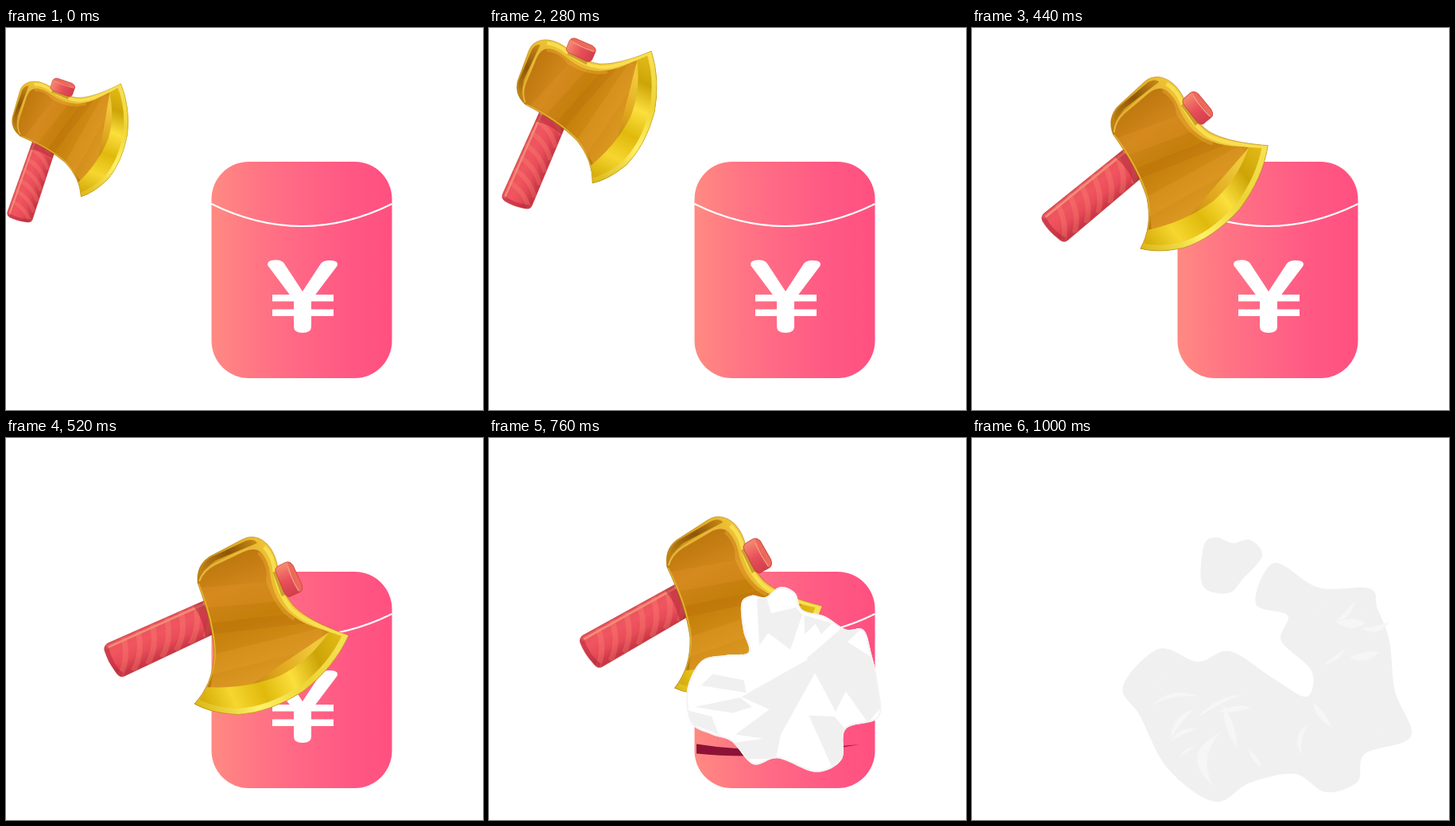
Animation, 600 px wide and 480 px high, one loop 1200 ms. Source, as an HTML page with a canvas:

```html
<!DOCTYPE html>
<html lang="en">
<head>
<meta charset="utf-8">
<title>Axe and red envelope</title>
<style>
html, body { margin: 0; width: 100%; height: 100%; overflow: hidden; background: #fff; }
canvas { display: block; width: 600px; height: 480px; }
</style>
</head>
<body>
<canvas id="stage" width="600" height="480"></canvas>
<script>
const ctx = document.getElementById('stage').getContext('2d');
const LOOP = 1200, STEP = 40;

const clamp = (v, a = 0, b = 1) => Math.min(b, Math.max(a, v));
const lerp = (a, b, k) => a + (b - a) * k;
const progress = (t, from, to) => clamp((t - from) / (to - from));

// Axe pose: time, centre x, centre y, degrees, scale
const POSES = [
  [80, 85.3, 173.7, -46.6, 0.71],
  [200, 98.3, 152, -46.6, 0.795],
  [280, 123, 148, -42, 0.857],
  [360, 183, 168, -29.1, 0.918],
  [440, 229, 226, -15, 0.972],
  [520, 267.7, 287.7, 0, 1],
  [580, 278, 324, 7, 1],
  [640, 272.3, 313.3, 5.2, 1],
  [840, 250.2, 232.3, -12, 1],
  [960, 228, 188, -20, 1]
];

// Smooth curve through the poses
function poseAt(t) {
  const last = POSES.length - 1;
  if (t <= POSES[0][0]) return POSES[0];
  if (t >= POSES[last][0]) return POSES[last];
  const i = POSES.findIndex(p => p[0] > t) - 1;
  const a = POSES[i], b = POSES[i + 1], span = b[0] - a[0];
  const k = (t - a[0]) / span, k2 = k * k, k3 = k2 * k;
  const slope = (n, j) => n === 0 || n === last ? (b[j] - a[j]) / span
    : (POSES[n + 1][j] - POSES[n - 1][j]) / (POSES[n + 1][0] - POSES[n - 1][0]);
  return a.map((v, j) =>
    (2 * k3 - 3 * k2 + 1) * v + (k3 - 2 * k2 + k) * span * slope(i, j) +
    (3 * k2 - 2 * k3) * b[j] + (k3 - k2) * span * slope(i + 1, j));
}

function gradient(x0, y0, x1, y1, ...colors) {
  const g = ctx.createLinearGradient(x0, y0, x1, y1);
  colors.forEach((c, i) => g.addColorStop(i / (colors.length - 1), c));
  return g;
}

function fill(path, style) {
  ctx.fillStyle = style;
  ctx.fill(path);
}

function stroke(path, style, width) {
  ctx.strokeStyle = style;
  ctx.lineWidth = width;
  ctx.stroke(path);
}

function inside(path, draw) {
  ctx.save();
  ctx.clip(path);
  draw();
  ctx.restore();
}

// Closed curve through every point
function blob(pts) {
  const n = pts.length / 2, p = new Path2D();
  const at = i => [pts[(i + n) % n * 2], pts[(i + n) % n * 2 + 1]];
  p.moveTo(...at(0));
  for (let i = 0; i < n; i++) {
    const a = at(i - 1), b = at(i), c = at(i + 1), d = at(i + 2);
    p.bezierCurveTo(b[0] + (c[0] - a[0]) / 6, b[1] + (c[1] - a[1]) / 6,
      c[0] - (d[0] - b[0]) / 6, c[1] - (d[1] - b[1]) / 6, c[0], c[1]);
  }
  p.closePath();
  return p;
}

// ---------- envelope ----------
const packet = new Path2D();
packet.roundRect(258.5, 168, 227, 272, 47);
const flap = new Path2D('M258.5 221Q372 277 485.5 221');
const yen = new Path2D('M329 298Q328 291 340 291.5Q347 291.5 350 296L373 331L396 296' +
  'Q399 292 407 292Q419 292 416.5 299L384 342V375Q384 383 373 383Q362 383 362 375V342Z');
const slash = new Path2D('M261 384.5Q345 398 466 385Q350 406 261 396.5Z');

function drawEnvelope(t) {
  if (t >= 800) return;
  const hit = t <= 640 ? progress(t, 560, 640) : 1 - progress(t, 640, 720);
  const s = 1 - 0.098 * hit;
  ctx.save();
  ctx.translate(296, 349);
  ctx.scale(s, s);
  ctx.translate(-296, -349);
  fill(packet, gradient(259, 0, 486, 0, '#ff8a82', '#ff7584', '#ff6685', '#ff5884', '#ff5080'));
  stroke(flap, '#fff', 2);
  fill(yen, '#fff');
  ctx.fillRect(335, 335, 77, 8.5);
  ctx.fillRect(335, 353.5, 77, 8.5);
  ctx.restore();
  if (t >= 640) fill(slash, '#8c1236');
}

// ---------- axe ----------
const handle = new Path2D('M128 258L262 199L272 241L149 299Q143 302 138 294Q128 281 124 267Q123 261 128 258Z');

function drawHandle() {
  fill(handle, gradient(190, 230, 207, 270, '#e8545a', '#f05560', '#e84c58', '#c93645'));
  inside(handle, () => {
    for (let x = 150; x < 260; x += 18) {
      const y = 289 - (x - 150) * 0.467;
      stroke(new Path2D(`M${x - 8} ${y + 12}Q${x + 5} ${y - 10} ${x - 2} ${y - 38}`),
        'rgba(255,145,120,.28)', 7);
    }
    stroke(new Path2D('M126 264L262 203'), '#f58a78', 3);
    stroke(new Path2D('M126 262Q132 286 146 298'), 'rgba(170,30,55,.45)', 5);
    stroke(new Path2D('M240 207Q254 224 257 250'), 'rgba(150,25,40,.4)', 12);
  });
  stroke(handle, 'rgba(190,50,60,.75)', 1);
}

const cut = 'Q413 288 374 318Q332 345 292 347.5Q258 346 237 334';
const head = new Path2D('M241 182Q239 160 256 149L298 127Q310 121 322 128Q336 137 341 158' +
  'Q344 190 362 211Q382 231 431 248' + cut + 'Q260 310 262 272Q260 232 241 182Z');
const face = new Path2D('M243 183Q247 170 262 161L299 143Q314 136 322 145Q330 155 332 170' +
  'Q336 205 359 222Q376 236 408 243L249 350Q264 292 262 260Q259 225 243 183Z');

function drawHead() {
  fill(head, gradient(242, 190, 340, 150, '#b97a10', '#dfa51c', '#f0c83a'));
  const recess = new Path2D('M246 168Q247 154 264 147L302 129Q312 126 316 132L263 154Z');
  fill(recess, gradient(247, 165, 316, 130, '#b97d14', '#8d5608', '#c98a18'));
  inside(head, () => {
    fill(face, gradient(270, 150, 325, 310, '#bd770d', '#cf851a', '#c47f0b', '#d18c18', '#dc9a24'));
    inside(face, () => {
      stroke(new Path2D('M235 202L345 192'), 'rgba(230,150,45,.25)', 26);
      stroke(new Path2D('M245 241L385 225'), 'rgba(170,90,0,.2)', 14);
      stroke(new Path2D('M245 288L400 250'), 'rgba(238,165,50,.22)', 24);
      stroke(new Path2D('M320 142Q336 160 332 178Q342 212 364 225'), 'rgba(244,184,60,.35)', 10);
    });
    const edge = new Path2D('M237 334L250 313Q300 316 344 299Q381 281 407 243L440 248V350H237Z');
    fill(edge, gradient(245, 330, 425, 255,
      '#d4ab08', '#f6d62f', '#e0b90c', '#fbdf3d', '#cda407', '#e2bb18'));
    stroke(new Path2D('M431 248' + cut),
      gradient(240, 334, 430, 250, '#dcb918', '#fff16a', '#eed434', '#f6e257'), 15);
    stroke(new Path2D('M325 137Q336 148 338 167Q343 197 360 216Q380 234 428 248'), '#f8df50', 5);
    stroke(new Path2D('M242 183Q262 232 263 272Q261 304 241 331'), '#e2b42c', 2);
    stroke(new Path2D('M243 180Q248 166 263 158L299 141Q313 135 322 142'), '#e9b840', 2);
  });
  stroke(head, 'rgba(160,105,0,.45)', 1);
}

const stub = new Path2D('M340 170Q337 164 342 161L351 156.5Q357 154 361 160L372 184' +
  'Q374 192 369 194L358 199Q353 201 350 194Z');

function drawStub() {
  stroke(new Path2D('M338 168L349 198'), 'rgba(150,85,0,.45)', 5);
  fill(stub, gradient(345, 160, 360, 198, '#f58a70', '#e8505a', '#d23e4c'));
  inside(stub, () => {
    stroke(new Path2D('M357 150L375 196'), '#ec6a58', 10);
    stroke(new Path2D('M354 161Q360 178 368 192'), '#f59a80', 1.5);
  });
  stroke(stub, 'rgba(195,55,55,.7)', 1);
}

function drawAxe(t) {
  if (t >= 1000) return;
  const [, x, y, deg, s] = poseAt(t);
  ctx.save();
  ctx.translate(x, y);
  ctx.rotate(deg * Math.PI / 180);
  ctx.scale(s, s);
  ctx.translate(-267.7, -287.7);
  drawHandle();
  drawHead();
  drawStub();
  ctx.restore();
}

// ---------- smoke ----------
const puff = [
  233, 267, 275, 257, 312, 252, 303, 215, 300, 170, 318, 157, 340, 160, 365, 143, 390, 153,
  402, 181, 440, 192, 475, 214, 505, 215, 518, 255, 530, 310, 530, 362, 475, 381, 468, 432,
  425, 453, 362, 430, 320, 440, 284, 402, 250, 390, 215, 370, 209, 315
];
const cloud = [
  235, 265, 284, 281, 325, 268, 380, 303, 421, 325, 427, 292, 389, 255, 397, 223, 357, 208,
  380, 157, 436, 188, 500, 189, 510, 214, 525, 255, 532, 318, 552, 375, 494, 397, 485, 432,
  445, 445, 406, 422, 350, 433, 305, 457, 246, 415, 212, 350, 190, 312
];
const wisp = blob([292, 134, 308, 125, 328, 132, 350, 128, 365, 148, 340, 178, 325, 194, 300, 193, 288, 178]);

const patch = d => fill(new Path2D(d), '#f0f0f0');

function drawPatches() {
  patch('M326 163L342 160L350 187L392 177L402 190L382 248L345 220L330 241Z');
  patch('M405 190L452 204L434 222L424 205L406 222Z');
  patch('M410 262L468 212H502L478 235L520 262L534 345L512 370L475 318L458 352L424 288Z');
  patch('M300 327L412 264L424 286L366 390L358 430L300 432L287 404L337 397L290 390L347 348Z');
  patch('M232 308L252 289L304 299L308 320Z');
  patch('M222 344L298 328L318 344L285 354Z');
  patch('M211 350L250 360L262 390L215 372Z');
  patch('M413 358L456 360L475 382L468 430L452 445Z');
}

function crescent(x0, y0, x1, y1, bend, width) {
  const dx = y0 - y1, dy = x1 - x0, len = Math.hypot(dx, dy);
  const mid = b => `${(x0 + x1) / 2 + dx / len * b} ${(y0 + y1) / 2 + dy / len * b}`;
  fill(new Path2D(`M${x0} ${y0}Q${mid(bend)} ${x1} ${y1}Q${mid(bend + width)} ${x0} ${y0}Z`), '#f6f6f6');
}

function drawGlints() {
  crescent(226, 336, 285, 325, -10, -10);
  crescent(250, 378, 280, 341, -4, -14);
  crescent(250, 381, 284, 366, -3, -11);
  crescent(261, 402, 281, 388, -2, -6);
  crescent(284, 351, 340, 322, -3, -10);
  crescent(310, 344, 351, 338, -8, 14);
  crescent(334, 390, 316, 335, -10, 18);
  crescent(303, 437, 313, 370, -24, -26);
  crescent(348, 392, 364, 414, -6, 12);
  crescent(415, 399, 423, 359, -8, -12);
  crescent(429, 332, 452, 363, -6, 16);
  crescent(443, 285, 470, 265, -2, 10);
  crescent(475, 276, 512, 269, -6, 20);
  crescent(458, 231, 481, 205, 0, 12);
  crescent(458, 231, 496, 232, -8, 22);
  crescent(490, 239, 525, 231, 3, 14);
}

function drawSmoke(t) {
  if (t < 720) return;
  const grow = lerp(0.5, 1, Math.sin(progress(t, 720, 840) * Math.PI / 2));
  const spread = progress(t, 840, 1000);
  const shade = Math.round(lerp(255, 240, spread));
  const shape = blob(puff.map((v, i) => lerp(v, cloud[i], spread)));
  ctx.save();
  ctx.translate(370, 320);
  ctx.scale(grow, grow);
  ctx.translate(-370, -320);
  fill(shape, `rgb(${shade},${shade},${shade})`);
  inside(shape, () => {
    drawPatches();
    if (spread < 1) stroke(shape, '#f3f3f3', 5);
  });
  ctx.restore();

  const late = progress(t, 880, 1000);
  if (!late) return;
  ctx.globalAlpha = late;
  fill(wisp, '#f0f0f0');
  drawGlints();
  ctx.globalAlpha = 1;
}

let start;
function render(now) {
  start ??= now;
  const t = Math.floor((now - start) % LOOP / STEP) * STEP;
  ctx.fillStyle = '#fff';
  ctx.fillRect(0, 0, 600, 480);
  drawEnvelope(t);
  drawAxe(t);
  drawSmoke(t);
  requestAnimationFrame(render);
}
requestAnimationFrame(render);
</script>
</body>
</html>
```
